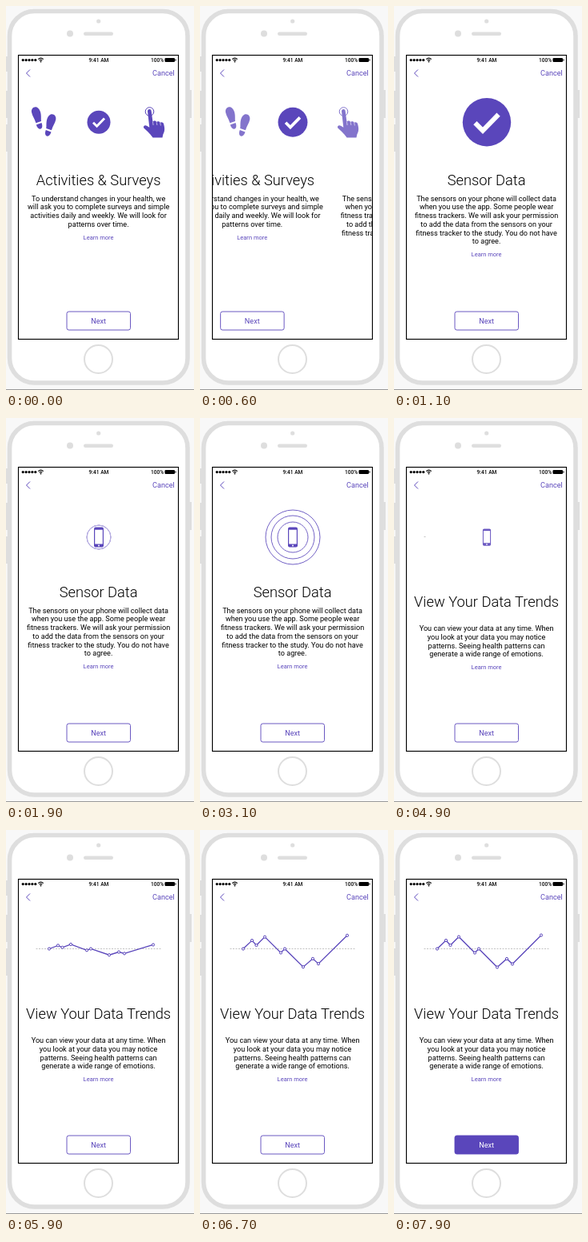
An HTML page for the animation above (8 s loop, 235 by 480 pixels).

```html
<!DOCTYPE html>
<html lang="en">
<head>
<meta charset="utf-8">
<title>Study onboarding</title>
<style>
html, body { margin: 0; width: 100%; height: 100%; overflow: hidden; background: #f8f8f8; }
svg { display: block; width: 235px; height: 480px; font: 9.12px Roboto, Inter, sans-serif; }
.mid { text-anchor: middle; }
.title { font-size: 18.3px; font-weight: 350; }
.link { font-size: 7.5px; }
.status { font-size: 6.6px; font-weight: 500; }
.ink { fill: #5a46bb; }
.line { fill: none; stroke: #5a46bb; }
.button rect { fill: #fff; stroke: #5a46bb; stroke-width: .9; }
.button text { fill: #5a46bb; }
.pressed rect { fill: #5a46bb; }
.pressed text { fill: #fff; }
.shell { fill: #dedede; }
</style>
</head>
<body>
<svg viewBox="0 0 235 480">
  <defs>
    <clipPath id="screen"><rect x="16" y="62" width="199" height="354"/></clipPath>
    <g id="foot">
      <path d="M-5-8C-5-15 4-16 5-7C5.5-2 4 1 4 4L-2.5 5C-3 0-5-4-5-8Z"/>
      <path d="M-2.5 7L4 6C5.5 14-1.5 15.5-2.5 7Z"/>
    </g>
  </defs>

  <!-- Phone body -->
  <g class="shell">
    <path d="M0 63h3v19h-3zM0 106h3v34h-3zM0 148h3v34h-3zM229 105h3v35h-3z"/>
    <rect x="4.500" y="6.500" width="222.500" height="464.500" rx="31" fill="#fff" stroke="#dedede" stroke-width="5.600"/>
    <circle cx="80" cy="34.500" r="4"/>
    <circle cx="115.700" cy="19" r="2.600"/>
    <rect x="97" y="32.500" width="37" height="4.500" rx="2.200"/>
    <circle cx="115.500" cy="441.500" r="17.500" fill="#fff" stroke="#dedede" stroke-width="2"/>
  </g>
  <path d="M0 479.500H235" stroke="#999"/>
  <rect x="15.500" y="61.500" width="200" height="355" fill="#fff"/>

  <!-- Status and navigation bars -->
  <g id="dots"></g>
  <g fill="none" stroke="#000" stroke-width="1.100">
    <path d="M40.300 66.500Q43.500 63.700 46.700 66.500M41.700 68.200Q43.500 66.500 45.300 68.200"/>
    <rect x="199" y="65.500" width="11.500" height="4" rx=".8" fill="#000"/>
    <path d="M212 66.500v2"/>
  </g>
  <circle cx="43.500" cy="69.600" r=".9"/>
  <text class="status mid" x="116" y="69.900">9:41 AM</text>
  <text class="status" x="181" y="69.900">100%</text>
  <path class="line" d="M30 79.500L25.500 84L30 88.500"/>
  <text class="ink" x="183" y="87.300">Cancel</text>

  <g clip-path="url(#screen)">
    <g id="pages"></g>
    <g id="sides" class="ink">
      <use href="#foot" transform="translate(39 140.500) rotate(-11) scale(1.080)"/>
      <use href="#foot" transform="translate(55.300 149.500) scale(-1 1) rotate(-11) scale(1.080)"/>
      <circle class="line" style="fill:none" cx="179.500" cy="132" r="5.300"/>
      <path d="M177 131.500a2.300 2.300 0 0 1 4.600-.4L183.500 145c.5-2 4-2.300 4.700.3c.8-1.700 4-1.400 4.500.7c1-1.400 3.800-.6 4.300 1.200c1.500 5 1.800 9-.6 13L195.500 164.500H183.500C180 159 175 155.500 172.300 152.500c-1.300-2.300 1.300-4.300 3.700-2.700l3.300 2Z"/>
      <path d="M183.500 145l.6 4M188.200 145.300l.7 3.700M192.700 146l.7 3.500" stroke="#fff" stroke-width=".6"/>
    </g>
    <g id="check">
      <circle class="ink" r="30"/>
      <path d="M-14.500 1L-5 10.500L14.500-9.500" fill="none" stroke="#fff" stroke-width="6"/>
    </g>
    <g id="sensor">
      <g id="rings" class="line"></g>
      <g id="phone" class="ink">
        <rect x="-6" y="-12.500" width="12" height="25" rx="2"/>
        <path d="M-4.800-9.300h9.600v17.800h-9.600z" fill="#fff"/>
        <circle cy="10.500" r="1" fill="#fff"/>
      </g>
    </g>
    <path id="axis" stroke="#bbb" stroke-width=".9" stroke-dasharray="2 1.500"/>
    <g id="chart">
      <polyline class="line" stroke-width="1.300"/>
      <g id="marks" class="line"></g>
    </g>
  </g>
  <rect x="15.500" y="61.500" width="200" height="355" fill="none" stroke="#000" stroke-width="1.150"/>
</svg>
<script>
const LOOP = 8000, PAGE = 200, BASE = 148.5;
const $ = id => document.getElementById(id);

const pages = [
  { title: 'Activities & Surveys', titleY: 224, bodyY: 243.6, linkY: 292, lines: [
    'To understand changes in your health, we',
    'will ask you to complete surveys and simple',
    'activities daily and weekly. We will look for',
    'patterns over time.'] },
  { title: 'Sensor Data', titleY: 224, bodyY: 243.6, linkY: 313.2, lines: [
    'The sensors on your phone will collect data',
    'when you use the app. Some people wear',
    'fitness trackers. We will ask your permission',
    'to add the data from the sensors on your',
    'fitness tracker to the study. You do not have',
    'to agree.'] },
  { title: 'View Your Data Trends', titleY: 235.5, bodyY: 266, linkY: 314, lines: [
    'You can view your data at any time. When',
    'you look at your data you may notice',
    'patterns. Seeing health patterns can',
    'generate a wide range of emotions.'] }
];
const presses = [300, 4000, 7900];
const radii = [19, 27, 34];
const points = [[54, 0], [65, -10.5], [70.5, -4.5], [81, -15], [101, 5],
  [106, 0], [129, 23], [141, 12.5], [148, 19], [184, -17]];

const label = (text, y, cls = '') =>
  `<text class="mid ${cls}" x="115.600" y="${y}">${text.replace('&', '&amp;')}</text>`;

$('pages').innerHTML = pages.map(p => `<g>
  ${label(p.title, p.titleY, 'title')}
  ${p.lines.map((s, i) => label(s, p.bodyY + i * 10.75)).join('')}
  ${label('Learn more', p.linkY, 'link ink')}
  <g class="button"><rect x="76" y="382" width="79.500" height="23" rx="2.500"/>
  ${label('Next', 397)}</g></g>`).join('');
$('dots').innerHTML = [0, 1, 2, 3, 4].map(i => `<circle cx="${21.2 + i * 3.9}" cy="67.600" r="1.600"/>`).join('');
$('rings').innerHTML = radii.map(() => '<circle/>').join('');
$('marks').innerHTML = points.map(([x]) => `<circle cx="${x}" r="1.600" fill="#fff"/>`).join('');

const ramp = (t, a, b) => Math.min(1, Math.max(0, (t - a) / (b - a)));
const ease = (t, a, b) => (1 - Math.cos(Math.PI * ramp(t, a, b))) / 2;
const easeOut = (t, a, b) => 1 - (1 - ramp(t, a, b)) ** 3;
const set = (el, attrs) => Object.entries(attrs).forEach(([k, v]) => el.setAttribute(k, v));

function draw(t) {
  const first = ease(t, 350, 1100);
  const scroll = first + ease(t, 4055, 4795);
  [...$('pages').children].forEach((page, i) => {
    set(page, { transform: `translate(${(i - scroll) * PAGE})` });
    const down = t >= presses[i] && t < presses[i] + 100;
    page.querySelector('.button').classList.toggle('pressed', down);
  });

  // Check badge grows, then shrinks into the phone's ring
  const shrink = ease(t, 1120, 1650);
  const size = (14.5 + 15.7 * first - 15.2 * shrink) / 30;
  const swap = ease(t, 1450, 1900);
  set($('sides'), { opacity: 1 - first });
  set($('check'), {
    transform: `translate(116 ${145.2 + 3.8 * shrink}) scale(${size})`,
    opacity: 1 - swap
  });

  const spread = ease(t, 2020, 2800);
  const fade = ease(t, 4000, 4850);
  set($('sensor'), { transform: `translate(116 149) scale(${1 - 0.15 * fade * fade})` });
  set($('rings'), { opacity: swap * (0.45 + 0.4 * spread) * (1 - fade) });
  [...$('rings').children].forEach((ring, i) => set(ring, { r: 15 + (radii[i] - 15) * spread }));
  set($('phone'), { opacity: swap * (1 - ease(t, 4820, 5200)) });

  // Points leave the axis one shortly after another
  const place = points.map(([x, dy], i) => [x, BASE + dy * easeOut(t, 5700 + i * 7, 6950 + i * 7)]);
  set($('axis'), { d: `M37.500 ${BASE}H${37.5 + 157.5 * ease(t, 4850, 5400)}` });
  set($('chart'), { opacity: ease(t, 5200, 5700) });
  set($('chart').firstElementChild, { points: place.join(' ') });
  [...$('marks').children].forEach((mark, i) => set(mark, { cy: place[i][1] }));
}

function tick() {
  draw(performance.now() % LOOP);
  requestAnimationFrame(tick);
}
tick();
</script>
</body>
</html>
```
